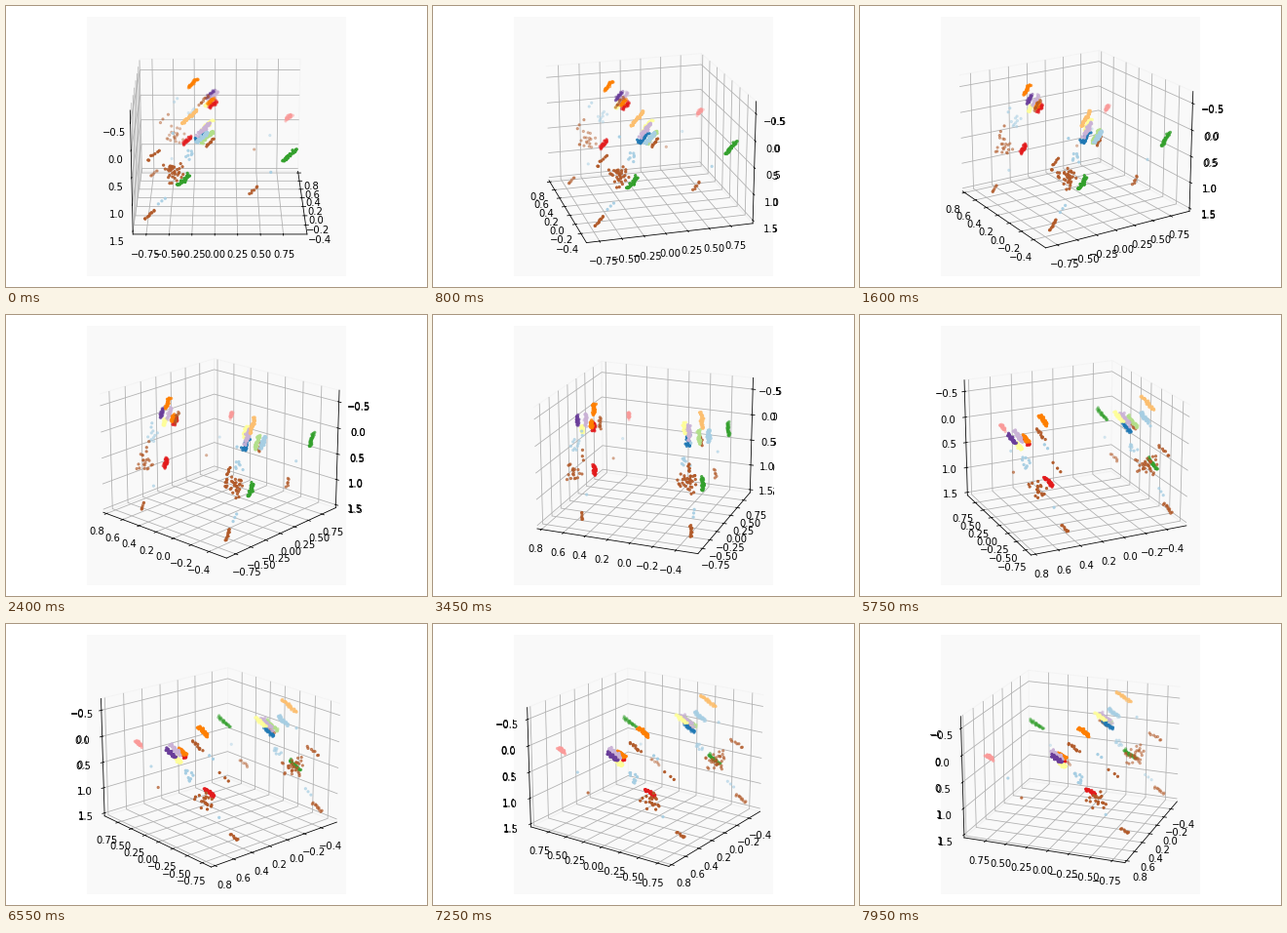
A matplotlib script that plays this animation: 432x288 px, repeating every 8000 ms.

```python
import numpy as np
import matplotlib.pyplot as plt
from matplotlib.animation import FuncAnimation

W, H, DPI = 432, 288, 72
FRAMES, STEP_MS = 160, 50
PAD = 10.8
SIDE = H - 2 * PAD
RECT = [(W - SIDE) / 2 / W, PAD / H, SIDE / W, SIDE / H]
ELEV, START = 20, -89.99

rng = np.random.default_rng(7)

# Positions are in the centred view box and scaled to data units at the end.
CENTER = np.array([0.057, 0.125, 0.42])
SCALE = np.array([1.601, 1.2012, -2.5536])
SLANT = np.array([0.09, 0.04, 0.075])

PAIRED = plt.get_cmap("Paired").colors
(SKY, BLUE, LIME, GREEN, PINK, RED,
 PEACH, ORANGE, LILAC, PURPLE, YELLOW, BROWN) = PAIRED

# colour, centre, length
DENSE = [
    (GREEN, 0.476, -0.45, 0.075, 1.0),
    (GREEN, -0.243, -0.503, -0.083, 0.85),
    (PINK, 0.503, 0.34, 0.077, 0.45),
    (ORANGE, -0.196, 0.325, 0.345, 0.75),
    (PURPLE, -0.07, 0.505, 0.2, 0.6),
    (LILAC, -0.05, 0.45, 0.203, 0.7),
    (YELLOW, -0.09, 0.46, 0.144, 0.5),
    (ORANGE, -0.068, 0.4, 0.18, 0.5),
    (RED, -0.05, 0.39, 0.16, 0.5),
    (YELLOW, -0.086, -0.313, 0.244, 0.7),
    (LILAC, -0.11, -0.352, 0.228, 0.9),
    (BLUE, -0.13, -0.355, 0.171, 0.7),
    (LIME, -0.088, -0.42, 0.195, 0.9),
    (SKY, -0.116, -0.5, 0.225, 0.8),
    (PEACH, -0.203, -0.478, 0.36, 0.95),
    (RED, -0.24, 0.305, -0.091, 0.7),
]

# colour, centre, length, count
SPARSE = [
    (BROWN, -0.12, 0.31, 0.216, 0.7, 10),
    (BROWN, -0.07, -0.43, 0.16, 0.6, 8),
    (BROWN, -0.485, -0.507, -0.338, 0.75, 10),
    (BROWN, -0.49, 0.3, -0.346, 0.6, 7),
    (BROWN, -0.45, -0.48, 0.085, 0.85, 7),
    (BROWN, 0.23, -0.44, -0.185, 0.75, 6),
    (BROWN, -0.415, 0.315, 0.075, 0.6, 3),
    (SKY, -0.397, -0.495, -0.243, 0.5, 3),
    (SKY, -0.365, 0.315, -0.244, 0.1, 1),
    (SKY, 0.368, 0.334, -0.058, 0.0, 1),
    (SKY, -0.32, -0.44, 0.235, 0.0, 1),
    (SKY, 0.35, -0.42, -0.062, 0.0, 1),
    (SKY, -0.325, 0.36, 0.2, 0.2, 2),
    (BROWN, 0.255, 0.366, -0.184, 0.0, 1),
]

# colour, centre, spread, count
BLOBS = [
    (BROWN, -0.32, -0.42, -0.06, 0.042, 32),
    (BROWN, -0.33, 0.416, -0.09, 0.04, 19),
    (SKY, -0.212, 0.475, 0.062, 0.022, 9),
    (SKY, -0.22, -0.36, 0.045, 0.025, 7),
]


def streak(x, y, z, length, count, noise=0.004):
    t = np.linspace(-0.5, 0.5, count) if count > 1 else np.zeros(1)
    t = t + rng.normal(0, 0.04, count)
    jitter = rng.normal(0, noise, (count, 3))
    return np.array([x, y, z]) + length * t[:, None] * SLANT + jitter


def blob(x, y, z, spread, count):
    return np.array([x, y, z]) + spread * rng.normal(0, 1, (count, 3)).clip(-1.6, 1.6)


def build_cloud():
    groups = [(c, streak(*rest, 32, 0.006)) for c, *rest in DENSE]
    groups += [(c, streak(*rest)) for c, *rest in SPARSE]
    groups += [(c, blob(*rest)) for c, *rest in BLOBS]
    points = np.vstack([p for _, p in groups])
    colors = [c for c, p in groups for _ in p]
    return CENTER + SCALE * points, colors


def add_box(zorder):
    ax = fig.add_axes(RECT, projection="3d", zorder=zorder)
    ax.set_facecolor("#f9f9f9")
    ax.set_zticks(np.arange(-0.5, 1.6, 0.5))
    for axis in (ax.xaxis, ax.yaxis, ax.zaxis):
        axis.pane.set_facecolor("none")
        axis.pane.set_edgecolor("#eeeeee")
    return ax


def fix_limits(ax):
    ax.set_xlim(-0.896, 1.01, view_margin=0)
    ax.set_ylim(-0.59, 0.84, view_margin=0)
    ax.set_zlim(1.56, -0.72, view_margin=0)


def turn(ax, azim):
    ax.view_init(elev=ELEV, azim=azim)
    # Keep the height axis on the near y side of the box.
    ax.zaxis.set_ticks_position("lower" if azim > -180 else "upper")


fig = plt.figure(figsize=(W / DPI, H / DPI), dpi=DPI, facecolor="white")

# The margin keeps a trace of the previous step's height labels.
trail = add_box(1)
trail.set_xticks([])
trail.set_yticks([])
fix_limits(trail)

box = add_box(2)
box.set_xticks(np.arange(-0.75, 0.8, 0.25))
box.set_yticks(np.arange(-2, 5) * 0.2)
cloud, colors = build_cloud()
box.scatter(*cloud.T, c=colors, s=5, depthshade=True)
fix_limits(box)


def update(i):
    turn(box, START - i)
    turn(trail, START - max(i - 1, 0))
    return []


anim = FuncAnimation(fig, update, frames=FRAMES, interval=STEP_MS,
                     init_func=lambda: update(0), repeat=True, repeat_delay=0)
plt.show()
```
